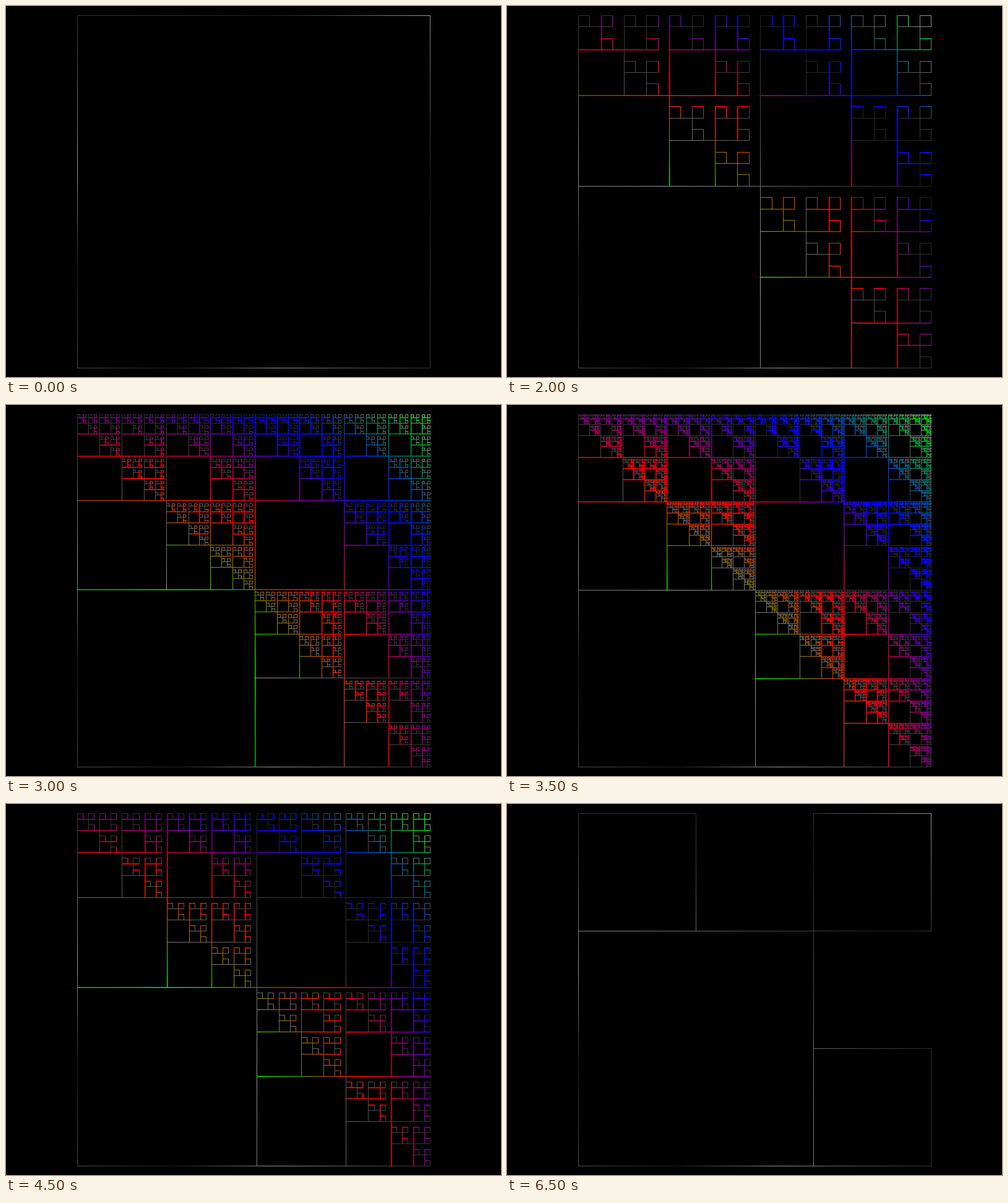
These frames come from a looping animation (800 by 600 pixels, 7 s). An HTML page with a canvas:

```html
<!DOCTYPE html>
<html lang="en">
<head>
<meta charset="utf-8">
<title>Square fractal</title>
<style>
  html, body { margin: 0; width: 100%; height: 100%; overflow: hidden; background: #000; }
  canvas { display: block; }
</style>
</head>
<body>
<canvas id="stage" width="800" height="600"></canvas>
<script>
const W = 800, H = 600, LEFT = 115, TOP = 15, SIDE = 570;
const STEP = 500, MAX_DEPTH = 7;
const STOPS = [[255, 0, 0], [0, 0, 255], [0, 255, 0]];
const ctx = document.getElementById('stage').getContext('2d');

// Red, blue and green bands in rings around the bottom left corner.
function ringColor(x, y) {
  const phase = Math.hypot(x - LEFT, TOP + SIDE - y) / (SIDE * Math.SQRT2) * 5;
  const band = Math.floor(phase), mix = phase - band;
  const from = STOPS[band % 3], to = STOPS[(band + 1) % 3];
  return from.map((v, i) => v + (to[i] - v) * mix);
}

const luma = ([r, g, b]) => 0.299 * r + 0.587 * g + 0.114 * b;

function outlineMask(depth) {
  const mask = new Uint8Array(W * H);
  const unit = SIDE / (2 ** (depth + 1) - 1);
  const px = k => Math.round(LEFT + k * unit);
  const py = k => Math.round(TOP + 0.05 + k * unit);

  function square(x, y, size) {
    const x0 = px(x), x1 = px(x + size), y0 = py(y), y1 = py(y + size);
    for (let i = x0; i <= x1; i++) mask[y0 * W + i] = mask[y1 * W + i] = 1;
    for (let j = y0; j <= y1; j++) mask[j * W + x0] = mask[j * W + x1] = 1;
  }

  function grow(x, y, level) {
    const size = 2 ** level;
    square(x, y + size - 1, size);
    if (!level) return;
    grow(x, y, level - 1);
    grow(x + size, y, level - 1);
    grow(x + size, y + size, level - 1);
  }

  grow(0, 0, depth);
  return mask;
}

// Brightness is per pixel; tint is shared by 2x2 blocks and taken from the even pixel.
function render(depth) {
  const mask = outlineMask(depth);
  const image = new ImageData(W, H);
  for (let y = 0; y < H; y++) {
    for (let x = 0; x < W; x++) {
      const at = y * W + x, ex = x & ~1, ey = y & ~1;
      const light = mask[at] ? luma(ringColor(x, y)) : 0;
      let rgb = [light, light, light];
      if (mask[ey * W + ex]) {
        const tint = ringColor(ex, ey), base = luma(tint);
        rgb = tint.map(v => light + v - base);
      }
      image.data.set([...rgb, 255], at * 4);
    }
  }
  return image;
}

const pictures = Array.from({ length: MAX_DEPTH + 1 }, (_, depth) => render(depth));
const start = performance.now();
let shown = -1;

function frame() {
  const step = Math.floor((performance.now() - start) / STEP) % (2 * MAX_DEPTH);
  const depth = Math.min(step, 2 * MAX_DEPTH - step);
  if (depth !== shown) ctx.putImageData(pictures[shown = depth], 0, 0);
  requestAnimationFrame(frame);
}
frame();
</script>
</body>
</html>
```
